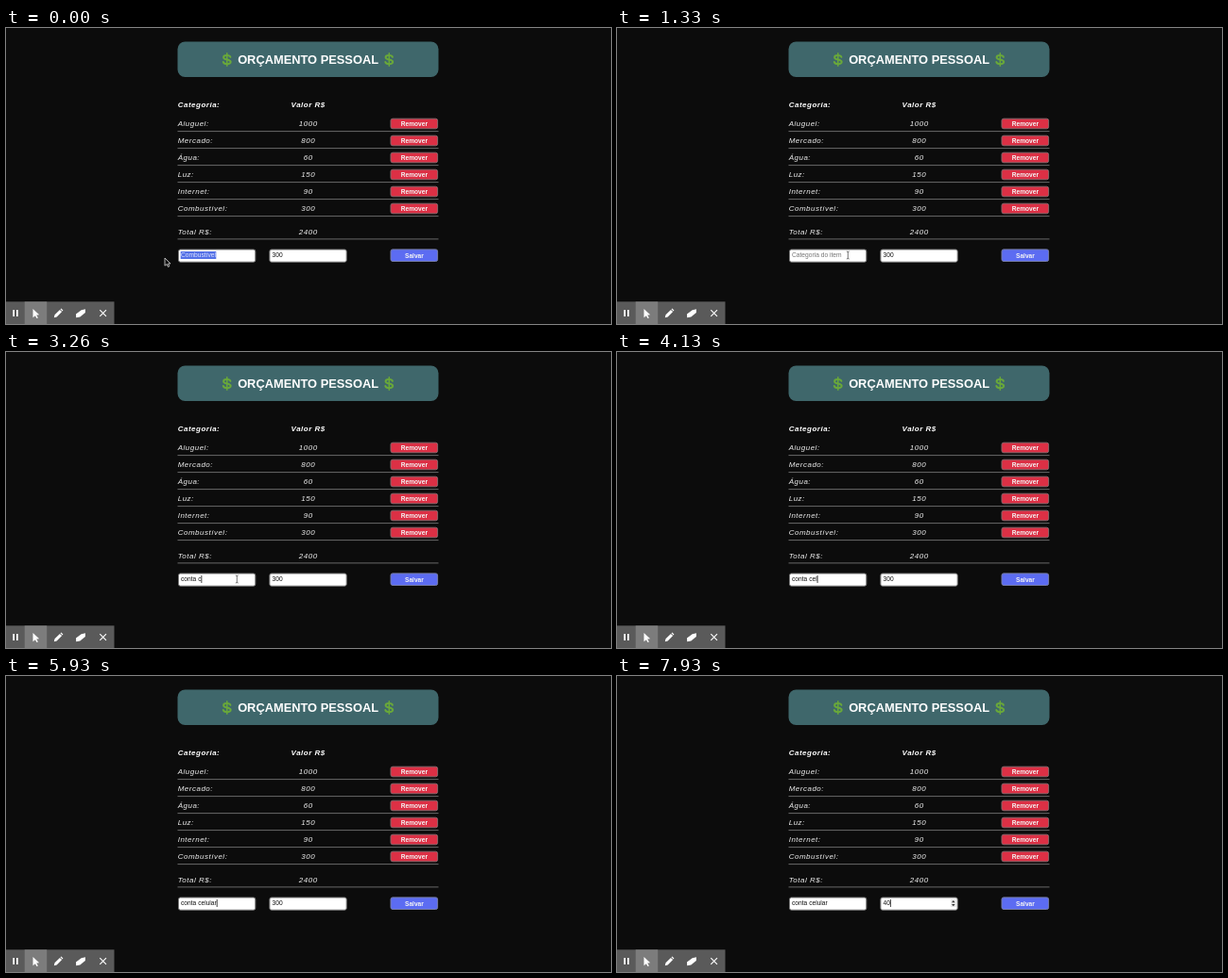
An HTML page for the animation above (8000 ms loop, 640x314 px).

```html
<!DOCTYPE html>
<html lang="pt-BR">
<head>
<meta charset="utf-8">
<title>Orçamento pessoal</title>
<style>
html, body { margin: 0; width: 100%; height: 100%; overflow: hidden; background: #0c0c0c; }
svg { display: block; width: 100vw; height: 100vh; font-family: "Liberation Sans", Arial, sans-serif; }
text { white-space: pre; }
.title { font-size: 12.85px; font-weight: bold; fill: #fff; text-anchor: middle; }
.cell { font-size: 8px; font-style: italic; letter-spacing: .5px; fill: #eee; }
.head { font-weight: bold; fill: #fff; }
.mid { text-anchor: middle; }
.label { font-size: 6.6px; font-weight: bold; fill: #f4f4f4; text-anchor: middle; }
.input { font-size: 6.67px; fill: #111; }
.field { fill: #fff; stroke: #777; }
.rule { stroke: #686868; }
</style>
</head>
<body>
<svg viewBox="0 0 640 314">
  <defs>
    <g id="dollar" fill="none" stroke="#69a83a" stroke-linecap="round">
      <path d="M0-6.7V6.7" stroke-width="1.5"/>
      <path d="M3.6-2.6C3-5.2-3.7-5.4-3.7-2.3C-3.7 .7 3.9-.7 3.9 2.5C3.9 5.5-3.4 5.2-4 2.5" stroke-width="2"/>
    </g>
  </defs>
  <rect width="640" height="314" fill="#0c0c0c"/>
  <rect x="181.5" y="14.5" width="276" height="37.5" rx="8" fill="#3f676b"/>
  <use href="#dollar" x="233.8" y="33.5"/>
  <use href="#dollar" x="405.3" y="33.5"/>
  <text class="title" x="319.6" y="38.2">ORÇAMENTO PESSOAL</text>

  <g id="table"></g>

  <rect class="field" x="182.5" y="235" width="81.3" height="13.2" rx="2"/>
  <rect class="field" x="278.9" y="235" width="81.3" height="13.2" rx="2"/>
  <rect id="selection" y="237" height="8" fill="#5370e6"/>
  <text id="category" class="input" x="185" y="243.4"></text>
  <text id="amount" class="input" x="281.5" y="243.4"></text>
  <rect id="caret" y="237" width=".8" height="8" fill="#111"/>
  <g id="spinner">
    <rect x="353" y="237" width="5.6" height="8.2" fill="#e8e8e8"/>
    <path d="M354 240.3L355.8 238L357.6 240.3ZM354 242L355.8 244.3L357.6 242Z" fill="#333"/>
  </g>

  <rect y="290.3" width="114.5" height="24" fill="#5a5a5a"/>
  <rect x="19.7" y="290.3" width="23.5" height="24" fill="#7c7c7c"/>
  <g fill="#fff">
    <path d="M7.3 299h1.7v7h-1.7zM11 299h1.7v7h-1.7z"/>
    <path d="M28.5 298L35.2 304.3L32.2 304.5L33.9 307.4L32.5 308.1L30.9 305.2L28.5 307.2Z"/>
    <path d="M50.8 307.2L51.5 304.3L56.9 298.9L59.1 301.1L53.7 306.5ZM57.5 298.3L58.4 297.6L60.4 299.6L59.7 300.5Z"/>
    <path d="M74 303.4L79.6 299.2L84 298.2L83.8 302L78.3 306.4L74.2 307.2Z"/>
    <path d="M99.3 299.2L106 305.9M106 299.2L99.3 305.9" stroke="#fff" stroke-width="1.1"/>
  </g>

  <path id="arrow" d="M0 0V8.2L2 6.5L3.4 9.4L4.8 8.8L3.4 6H6Z" fill="#111" stroke="#ddd" stroke-width=".8"/>
  <path id="beam" d="M-1.4-4Q0-4 0-3Q0-4 1.4-4M0-3V3M-1.4 4Q0 4 0 3Q0 4 1.4 4" fill="none" stroke="#555" stroke-width=".8"/>
</svg>
<script>
const LOOP = 8000;
const $ = id => document.getElementById(id);
const show = (id, visible) => $(id).setAttribute("visibility", visible ? "visible" : "hidden");
const place = (id, x, y) => $(id).setAttribute("transform", `translate(${x} ${y})`);

const rule = y => `<path class="rule" d="M181.5 ${y}H457.5"/>`;
const row = (name, value, y, style = "") =>
  `<text class="cell ${style}" x="181.7" y="${y}">${name}</text>
   <text class="cell mid ${style}" x="319.7" y="${y}">${value}</text>`;
const button = (label, y, height, fill, border) =>
  `<rect x="407" y="${y - height / 2}" width="49.6" height="${height}" rx="2" fill="${fill}" stroke="${border}"/>
   <text class="label" x="431.9" y="${y + 2.4}">${label}</text>`;

const expenses = { Aluguel: 1000, Mercado: 800, "Água": 60, Luz: 150, Internet: 90, "Combustível": 300 };
const total = Object.values(expenses).reduce((sum, value) => sum + value);

$("table").innerHTML = row("Categoria:", "Valor R$", 83.9, "head") +
  Object.entries(expenses).map(([name, value], i) => {
    const y = 101.5 + 18 * i;
    return row(name + ":", value, y + 2.7) + rule(y + 8.1) + button("Remover", y, 10.6, "#dc3045", "#89666b");
  }).join("") +
  row("Total R$:", total, 218.5) + rule(223.9) + button("Salvar", 241.2, 12.6, "#5c6cf2", "#777da8");

// [time, value] lists: the last entry reached is current
const at = (steps, t) => steps.findLast(([time]) => t >= time)[1];

const categorySteps = [
  [0, "Combustível"], [470, ""], [2200, "c"], [2330, "co"], [2460, "cont"],
  [2730, "conta"], [2860, "conta "], [3260, "conta c"], [3400, "conta ce"],
  [3600, "conta cel"], [5600, "conta celu"], [5670, "conta celul"],
  [5730, "conta celula"], [5930, "conta celular"]
];
const amountSteps = [[0, "300"], [7730, "4"], [7930, "40"]];
const caretSteps = [
  [0, false], [470, true], [1000, false], [1600, true], [2060, false], [2200, true],
  [4330, false], [4800, true], [5400, false], [5600, true], [6460, false], [7730, true]
];
const TAB = 6730, BEAM_HIDDEN = 4130;

// Pointer glides in short steps between two rests
function glide(t, start, end, from, to) {
  const stepped = Math.floor((t - start) / 66 + 1) * 66 / (end - start);
  const p = t < start ? 0 : Math.min(1, stepped);
  const eased = p * p * (3 - 2 * p);
  return from.map((v, i) => v + (to[i] - v) * eased);
}

function draw(t) {
  const category = at(categorySteps, t);
  $("category").textContent = category || "Categoria do item";
  $("amount").textContent = at(amountSteps, t);

  const onAmount = t >= TAB;
  const field = $(onAmount ? "amount" : "category");
  const x = onAmount ? 281.5 : 185;
  const width = onAmount || category ? field.getComputedTextLength() : 0;
  const selected = t < 470 || (onAmount && t < 7730);

  $("category").style.fill = t < 470 ? "#dce2ff" : category ? "#111" : "#757575";
  $("amount").style.fill = onAmount && selected ? "#dce2ff" : "#111";
  $("selection").setAttribute("x", x - .3);
  $("selection").setAttribute("width", width + .6);
  $("caret").setAttribute("x", x + width);
  show("selection", selected);
  show("caret", at(caretSteps, t));
  show("spinner", onAmount);

  const pointer = t < 1000
    ? glide(t, 60, 660, [168, 244], [211, 238])
    : glide(t, 1200, 1330, [211, 238], [244.3, 241]);
  const overField = pointer[0] > 182;
  place("arrow", ...pointer);
  place("beam", ...pointer);
  show("arrow", !overField);
  show("beam", overField && t < BEAM_HIDDEN);
}

const began = performance.now();
function frame() {
  draw((performance.now() - began) % LOOP);
  requestAnimationFrame(frame);
}
frame();
</script>
</body>
</html>
```
